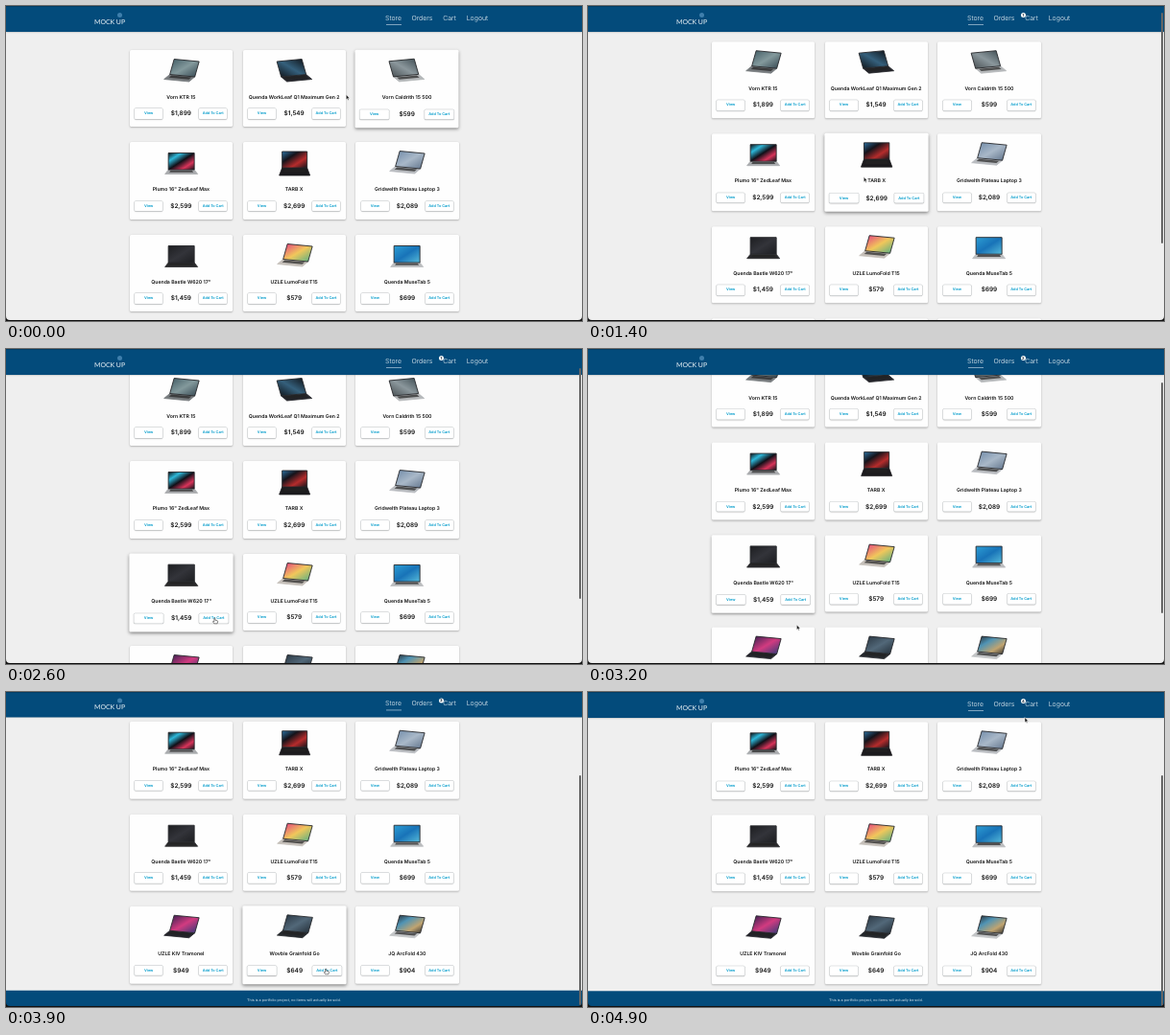
Recreate the animation shown at these times as an HTML page. Size 600 by 329 pixels, loop 5 s.

```html
<!DOCTYPE html>
<html lang="en">
<head>
<meta charset="utf-8">
<title>Store</title>
<style>
html, body { margin: 0; width: 100%; height: 100%; overflow: hidden; background: #fff; }
#stage { position: relative; width: 600px; height: 329px; overflow: hidden; font-family: Inter, "Open Sans", sans-serif; text-rendering: geometricPrecision; }
#stage div, #stage svg { position: absolute; white-space: nowrap; }
#page { left: 0; top: 0; width: 600px; height: 440px; background: #efefef; }
.card { width: 107.3px; height: 80.5px; background: #fefefe; border-radius: 1.5px; }
.card svg { left: 0; top: 0; width: 107.3px; height: 48px; overflow: visible; }
.title { left: 0; width: 100%; top: 46px; line-height: 8px; text-align: center; font-size: 5.2px; font-weight: 600; color: #111; }
.price { left: 0; width: 100%; top: 61.7px; line-height: 10px; text-align: center; font-size: 6.4px; font-weight: 600; color: #111; }
.btn { top: 61.7px; width: 29.4px; height: 10.4px; line-height: 10.4px; text-align: center; font-size: 3.8px; font-weight: 700; color: #15a3cf; background: #fff; border-radius: 1px; box-shadow: 0 0 0 .5px #c4c8ca, 0 .6px 1.3px rgba(0,0,0,.4); }
.view { left: 5.3px; }
.add { left: 72.3px; }
#head { left: 0; top: 0; width: 600px; height: 26.6px; background: #034b7b; box-shadow: 0 .5px 1.5px rgba(0,0,0,.3); color: #f2f6f9; }
#head .nav { top: 8px; line-height: 10px; font-size: 6.95px; font-weight: 300; }
#brand { left: 92px; top: 11.5px; font: 6.9px/10px Lato, sans-serif; }
#mark { left: 115.5px; top: 7px; width: 5px; height: 5px; border-radius: 50%; background: #3f7fac; }
#line { left: 395.5px; top: 19.4px; width: 16.5px; height: .7px; background: #7fa5c0; }
#badge { left: 450.7px; top: 6.5px; width: 5.4px; height: 5.4px; border-radius: 50%; background: #fff; color: #123; font-size: 4px; font-weight: 700; line-height: 5.4px; text-align: center; }
#foot { left: 0; top: 423.3px; width: 600px; height: 16.7px; line-height: 20.4px; background: #034b7b; color: #d5e2eb; font-size: 3.75px; text-align: center; }
#bar { left: 597px; top: 0; width: 2.2px; border-radius: 1.1px; background: #666; }
#frame { left: 0; top: 0; width: 600px; height: 329px; }
</style>
</head>
<body>
<div id="stage">
  <div id="page"><div id="foot">This is a portfolio project, no items will actually be sold.</div></div>
  <div id="head">
    <div id="mark"></div><div id="brand">MOCK UP</div>
    <div class="nav" style="left:395px">Store</div>
    <div class="nav" style="left:422.4px">Orders</div>
    <div class="nav" style="left:455.2px">Cart</div>
    <div class="nav" style="left:479.7px">Logout</div>
    <div id="line"></div><div id="badge"></div>
  </div>
  <div id="bar"></div>
  <svg id="frame" viewBox="0 0 600 329">
    <path d="M0 324Q0 328 4 328H596Q600 328 600 324V329H0Z" fill="#111"/>
    <path d="M0 .3H600" stroke="#000" stroke-opacity=".4" stroke-width=".6"/>
    <g id="cursor" stroke="#fff" stroke-width=".5" stroke-linejoin="round" fill="#111">
      <path id="arrow" d="M0 0V5.200L1.200 4.200 2 6 2.900 5.600 2.100 3.900H3.700Z"/>
      <path id="hand" fill="#fff" stroke="#111" d="M-.5 .4Q0 -.4 .5 .4V2.200L2.900 2.800Q3.400 3 3.200 4L2.700 5.800H-.6L-2 3.700Q-1.800 2.900-.5 3.700Z"/>
    </g>
  </svg>
</div>
<script>
const $ = id => document.getElementById(id);
const LEFT = 128.7, TOP = 45.8, DX = 117.8, DY = 96.4, W = 107.3, H = 80.5;
const MAX = 110.7, LOOP = 5000, STEP = 100;

// Hinge start, hinge direction, lid upwards, base outwards, widening of the base
const POSES = {
  front: { hinge: [-13.5, 29], along: [27, 0], up: [0, -17.5], out: [0, 4.5], splay: 3.5 },
  thick: { hinge: [-13, 27], along: [26, 0], up: [0, -17], out: [0, 8], splay: 3 },
  turned: { hinge: [-12, 25.5], along: [26, 2.5], up: [4.5, -16], out: [-6, 5], splay: 0 }
};

// title, price, pose, mirrored, body colour, screen colours
const ITEMS = [
  ["Vorn KTR 15", 1899, "turned", false, "#777b7e", "#3f5a63 #83999c #32444e"],
  ["Quenda WorkLeaf Q1 Maximum Gen 2", 1549, "turned", true, "#24252a", "#0c0e12 #35607c #0c0e12"],
  ["Vorn Caldrith 15 500", 599, "turned", true, "#b5b8ba", "#3c4b51 #8b979c #444b4e"],
  ["Plumo 16\" ZedLeaf Max", 2599, "front", false, "#a9abae", "#0b0b10 #2eb7d8 #101018 #d8345a #101018"],
  ["TARB X", 2699, "thick", false, "#1b1a1d", "#2a6fa0 #15131a #b52c2c #15131a"],
  ["Gridwelth Plateau Laptop 3", 2089, "turned", false, "#b9bcc0", "#6f8aa8 #a9b8c8 #5d7088"],
  ["Quenda Bastle W620 17\"", 1459, "front", false, "#29292b", "#1d1e21 #33343a #1d1e21"],
  ["UZLE LumoFold T15", 579, "turned", false, "#c5bfb9", "#e33b82 #f1c75b #4cad86"],
  ["Quenda MuseTab 5", 699, "front", false, "#bbbdbf", "#2d9ed4 #1873b8 #56bad9"],
  ["UZLE KIV Tramonel", 949, "turned", false, "#232329", "#30204f #d23b80 #273a78"],
  ["Wovble Grainfold Go", 649, "turned", false, "#25282c", "#28343f #526879 #202a33"],
  ["JQ ArcFold 430", 904, "turned", false, "#c2c4c6", "#22262c #4f93b4 #c0a470 #22262c"]
];

const smooth = p => p * p * (3 - 2 * p);
const settle = p => 1 - (1 - p) ** 3;
const span = (t, a, b) => Math.min(1, Math.max(0, (t - a) / (b - a)));

// Two wheel strokes; the second overshoots the end and springs back
const OVER = 7.3;
const scrollAt = t => 25 * smooth(span(t, 1200, 1700))
  + (MAX + OVER - 25) * smooth(span(t, 3075, 3500))
  - OVER * settle(span(t, 3500, 4200));

// Pointer stops: time, x, y
const STOPS = [[-200, 400, 70], [0, 354.3, 92.5], [300, 331, 112], [700, 331, 112], [1000, 291, 176],
  [1700, 284.5, 180.5], [2400, 217.4, 281], [2800, 217.4, 281], [3100, 217.4, 288], [3600, 217.4, 288],
  [3900, 333.2, 289], [4300, 333.2, 289], [4700, 455, 26.5]];
const CLICKS = [700, 2700, 3700, 4300];

function pointerAt(t) {
  const n = STOPS.findIndex(s => s[0] > t);
  const b = STOPS.at(n), a = n > 0 ? STOPS[n - 1] : b;
  const p = a === b ? 0 : (t - a[0]) / (b[0] - a[0]);
  return [a[1] + (b[1] - a[1]) * p, a[2] + (b[2] - a[2]) * p];
}

function laptop([, , pose, mirrored, body, screen], id) {
  const { hinge, along, up, out, splay } = POSES[pose];
  const spot = (u, side, v) => [0, 1].map(k => hinge[k] + along[k] * u + side[k] * v);
  const deck = (u, v) => {
    const [x, y] = spot(u, out, v);
    return [x + splay * v * (2 * u - 1), y];
  };
  const quad = (at, u, v0, v1, look) =>
    `<polygon points="${[at(u, v0), at(1 - u, v0), at(1 - u, v1), at(u, v1)].join(" ")}" ${look}/>`;
  const colors = screen.split(" ");
  const stops = colors.map((c, n) => `<stop offset="${n / (colors.length - 1)}" stop-color="${c}"/>`).join("");
  return `<svg><defs><linearGradient id="${id}" x2="1" y2="1">${stops}</linearGradient></defs>
    <g transform="translate(${W / 2}) scale(${mirrored ? -1 : 1} 1)">
    ${quad(deck, 0, 0, 1, `fill="${body}" stroke="${body}" stroke-width=".8" stroke-linejoin="round"`)}
    ${quad(deck, .1, .15, .6, 'fill="#222" fill-opacity=".7"')}
    ${quad((u, v) => spot(u, up, v), 0, 0, 1, `fill="url(#${id})" stroke="#26282b" stroke-width=".9" stroke-linejoin="round"`)}</g></svg>`;
}

const cards = ITEMS.map((item, i) => {
  const el = document.createElement("div");
  const x = LEFT + i % 3 * DX, y = TOP + Math.floor(i / 3) * DY;
  el.className = "card";
  el.style.left = x + "px";
  el.style.top = y + "px";
  el.innerHTML = laptop(item, "screen" + i) + `<div class="title">${item[0]}</div>
    <div class="price">$${item[1].toLocaleString("en-US")}</div>
    <div class="btn view">View</div><div class="btn add">Add To Cart</div>`;
  $("page").append(el);
  return { el, x, y };
});

// Pointer position inside a card
function local(card, t) {
  const [x, y] = pointerAt(t);
  return [x - card.x, y + scrollAt(t) - card.y];
}
const within = ([x, y], x0, y0, x1, y1) => x >= x0 && x <= x1 && y >= y0 && y <= y1;
const show = (id, on) => $(id).style.display = on ? "" : "none";

function draw(t) {
  const s = scrollAt(t), over = Math.max(0, s - MAX);
  $("page").style.transform = `translateY(${-s}px)`;
  $("head").style.transform = `translateY(${-over}px)`;
  $("bar").style.top = 87 * s / MAX + "px";
  $("bar").style.height = 241 - over * 1.8 + "px";
  show("bar", t >= 1300);

  let hand = false;
  for (const c of cards) {
    // Share of the last 200 ms spent over the card gives the hover fade
    const h = [0, 50, 100, 150].filter(d => within(local(c, t - d), 0, 0, W, H)).length / 4;
    c.el.style.transform = h ? `scale(${1 + .012 * h})` : "";
    c.el.style.boxShadow = `0 ${.8 + .7 * h}px ${2 + 1.6 * h}px rgba(0,0,0,${.3 + .16 * h})`;
    const p = local(c, t);
    hand ||= within(p, 72, 61, 102, 72.5) || within(p, 5, 61, 35, 72.5);
  }
  $("cursor").setAttribute("transform", `translate(${pointerAt(t)})`);
  show("hand", hand);
  show("arrow", !hand);

  const count = CLICKS.filter(c => c <= t).length;
  $("badge").textContent = count;
  show("badge", count);
}

const start = performance.now();
function tick(now) {
  draw(Math.floor(Math.max(0, now - start) % LOOP / STEP) * STEP);
  requestAnimationFrame(tick);
}
draw(0);
requestAnimationFrame(tick);
</script>
</body>
</html>
```
